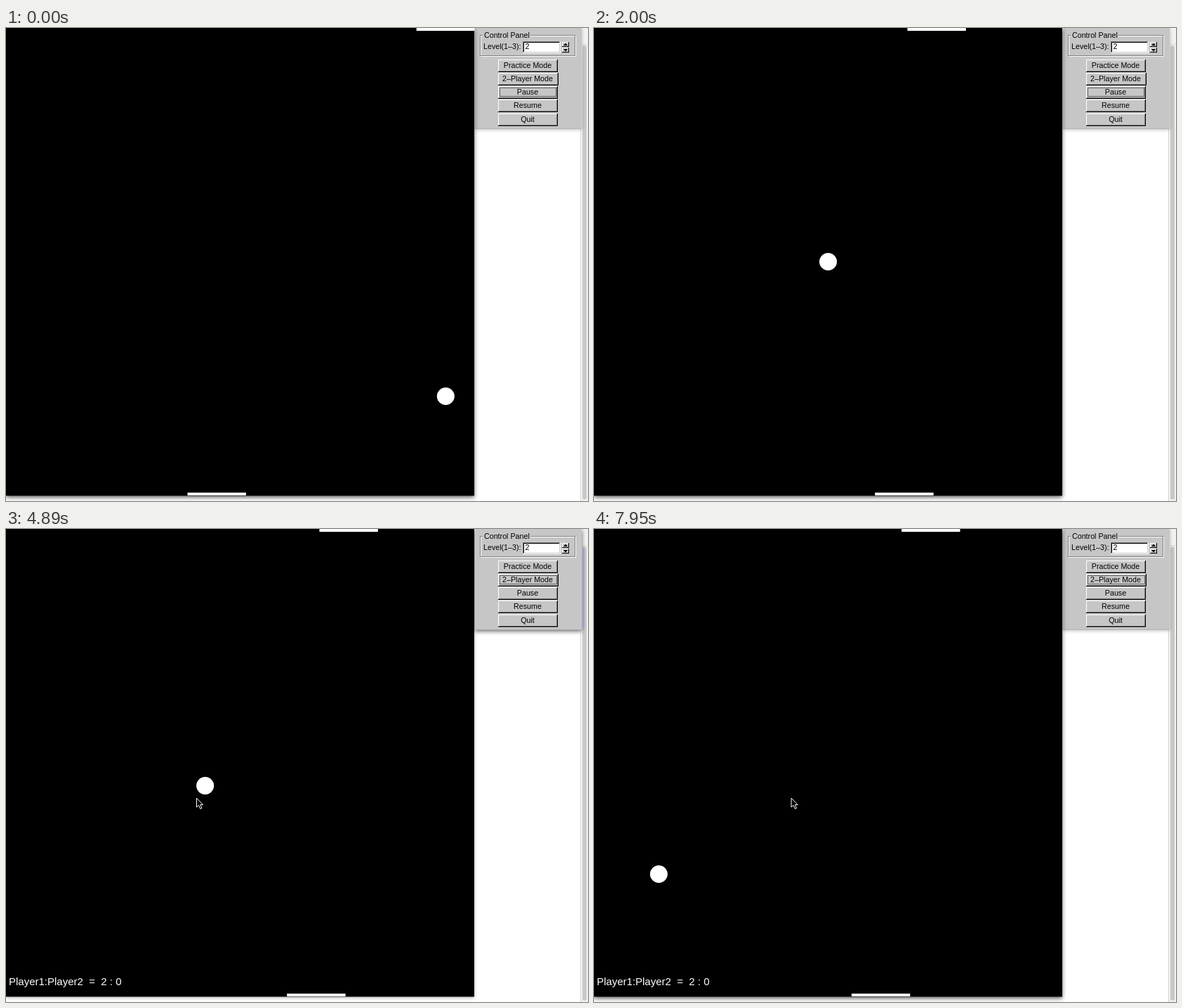
An HTML page with a canvas for the animation above (7.99 s loop, 829 by 675 pixels).

```html
<!DOCTYPE html>
<html lang="en">
<head>
<meta charset="utf-8">
<title>Pong</title>
<style>
  html, body { margin: 0; width: 100%; height: 100%; overflow: hidden; background: #fff; }
  canvas { display: block; }
</style>
</head>
<body>
<canvas id="stage" width="829" height="675"></canvas>
<script>
const ctx = document.getElementById('stage').getContext('2d');
const LOOP = 7990, FIELD = 667, CENTER = 333.5, RADIUS = 12.5;
const PADDLE = FIELD / 8, KEY_STEP = FIELD / 80;
const VX = 4.02, VY = 2.65, WALL = 655.7;
const SANS = '"Liberation Sans", Arial, sans-serif';

const BUTTONS = ['Practice Mode', '2–Player Mode', 'Pause', 'Resume', 'Quit'];
const ARROW = [[0, 0], [0, 13], [3, 10.3], [5.3, 15.4], [7.5, 14.4], [5.2, 9.5], [9.2, 9.5]];

// time, x, y
const POINTER_PATH = [
  [3050, 743, 318], [3520, 743, 318], [3700, 738, 255], [3900, 727, 140],
  [4100, 719, 80], [4190, 718, 75], [4370, 718, 75], [4620, 480, 210],
  [4780, 320, 350], [4890, 271.5, 384], [5000, 271.5, 384], [5090, 281, 384]
];

// Number of n evenly spaced ticks, first to last, reached at time t.
function ticks(t, first, last, n) {
  const i = Math.floor((t - first) / (last - first) * (n - 1) + 1e-6) + 1;
  return Math.max(0, Math.min(n, i));
}

function rect(x, y, w, h, color) {
  ctx.fillStyle = color;
  ctx.fillRect(x, y, w, h);
}

function text(str, x, y, size = 10.7, color = '#000', align = 'left') {
  ctx.font = `${size}px ${SANS}`;
  ctx.textAlign = align;
  ctx.fillStyle = color;
  ctx.fillText(str, x, y);
}

function bevel(x, y, w, h, light, dark) {
  rect(x, y, w, 1, light);
  rect(x, y, 1, h, light);
  rect(x, y + h - 1, w, 1, dark);
  rect(x + w - 1, y, 1, h, dark);
}

function windowBox(x, y, w, h, color, active) {
  ctx.save();
  ctx.shadowColor = `rgba(0,0,0,${active ? 0.6 : 0.28})`;
  ctx.shadowBlur = active ? 6 : 5;
  ctx.shadowOffsetY = active ? 2 : 1;
  rect(x, y, w, h, color);
  ctx.restore();
}

function drawPage(panelActive) {
  rect(0, 0, 829, 675, '#fff');
  rect(818, 0, 1, 675, '#d4d4d4');
  rect(819, 0, 10, 675, '#f2f2f2');
  rect(819, 23, 10, 1, '#dcdcdc');
  ctx.fillStyle = '#c8c8c8';
  ctx.beginPath();
  ctx.roundRect(821, 25, 6, 648, 3);
  ctx.fill();
  if (panelActive) rect(822, 28, 2, 115, '#b4b4ee');
}

function drawButton(label, i, focused) {
  const x = 701, y = Math.round(44.5 + i * 19.3), w = i === 1 ? 86 : 85, h = 18;
  bevel(x, y, w, h, '#fff', '#000');
  rect(x + 1, y + h - 2, w - 2, 1, '#808080');
  rect(x + w - 2, y + 1, 1, h - 2, '#808080');
  if (focused) {
    ctx.save();
    ctx.setLineDash([1, 1]);
    ctx.lineWidth = 1;
    ctx.strokeStyle = '#000';
    ctx.strokeRect(x + 2.5, y + 2.5, w - 5, h - 6);
    ctx.restore();
  }
  text(label, 743, y + 12, 10.7, '#000', 'center');
}

function drawSpinner() {
  for (const [y, dir] of [[20, -1], [28, 1]]) {
    bevel(792, y, 10, 7, '#fff', '#000');
    ctx.fillStyle = '#000';
    ctx.beginPath();
    ctx.moveTo(794, y + 3.5 - dir * 1.5);
    ctx.lineTo(800, y + 3.5 - dir * 1.5);
    ctx.lineTo(797, y + 3.5 + dir * 2);
    ctx.fill();
  }
}

function drawPanel(active, focusIndex) {
  windowBox(668, 0, 152, 144, '#c6c6c6', active);
  rect(668, 143, 152, 1, '#b4b4b4');
  ctx.lineWidth = 1;
  for (const [shift, color] of [[1, '#fff'], [0, '#808080']]) {
    ctx.strokeStyle = color;
    ctx.strokeRect(675.5 + shift, 10.5 + shift, 135, 29);
  }
  rect(679, 9, 68, 4, '#c6c6c6');
  text('Control Panel', 681, 14);
  text('Level(1–3):', 680, 30);
  rect(736, 19, 54, 17, '#fff');
  bevel(736, 19, 54, 17, '#808080', '#fff');
  bevel(737, 20, 52, 15, '#000', '#c6c6c6');
  text('2', 739.5, 30);
  drawSpinner();
  BUTTONS.forEach((label, i) => drawButton(label, i, i === focusIndex));
}

function gameState(t) {
  const first = ticks(t, 40, 800, 20) + ticks(t, 840, 1620, 20) + ticks(t, 1660, 2000, 9);
  const tracked = WALL - Math.abs(626.3 + VX * first - WALL);
  const second = t < 4370 ? 0
    : Math.min(20, 0.4 + ticks(t, 4410, 5180, 20))
      + ticks(t, 6330, 7120, 20) + ticks(t, 7160, 7950, 20);
  const ball = t < 2000
    ? [tracked, 525.5 + VY * first]
    : [CENTER - VX * second, CENTER + VY * second];
  const bottomKeys = ticks(t, 80, 800, 10) + ticks(t, 960, 1920, 7) - ticks(t, 7080, 7680, 4);
  return {
    ball,
    top: tracked - PADDLE / 2 - (t >= 7880 ? KEY_STEP : 0),
    bottom: 258.5 + KEY_STEP * bottomKeys
  };
}

function drawField(t, active) {
  const { ball, top, bottom } = gameState(t);
  windowBox(0, 0, FIELD, FIELD + 0.5, '#000', active);
  ctx.save();
  ctx.beginPath();
  ctx.rect(0, 0, FIELD, FIELD);
  ctx.clip();
  rect(top, 0, PADDLE, 4, '#fff');
  rect(bottom, 663, PADDLE, 4, '#fff');
  ctx.beginPath();
  ctx.arc(ball[0], ball[1], RADIUS, 0, Math.PI * 2);
  ctx.fill();
  if (t >= 4370) text('Player1:Player2  =  2 : 0', 4, 651, 15, '#fff');
  ctx.restore();
}

function drawPointer(time) {
  if (time < POINTER_PATH[0][0]) return;
  const t = Math.floor((time - 10) / 40) * 40 + 10;
  const next = POINTER_PATH.findIndex(p => p[0] > t);
  const b = POINTER_PATH.at(next), a = next > 0 ? POINTER_PATH[next - 1] : b;
  const f = a === b ? 0 : (t - a[0]) / (b[0] - a[0]);
  const x = a[1] + (b[1] - a[1]) * f, y = a[2] + (b[2] - a[2]) * f;

  if (x > 668 && y > 144) {
    const left = Math.round(x) - 3, upper = Math.round(y) - 8;
    rect(left + 3, upper + 1, 1, 14, '#000');
    for (const edge of [upper, upper + 15]) {
      rect(left, edge, 3, 1, '#000');
      rect(left + 4, edge, 3, 1, '#000');
    }
    return;
  }
  const overField = x < 668;
  ctx.beginPath();
  ARROW.forEach(([dx, dy]) => ctx.lineTo(x + dx, y + dy));
  ctx.closePath();
  ctx.fillStyle = overField ? '#000' : '#fff';
  ctx.strokeStyle = overField ? '#fff' : '#000';
  ctx.lineWidth = 1;
  ctx.fill();
  ctx.stroke();
}

function draw() {
  const t = performance.now() % LOOP;
  const panelActive = t >= 4280 && t < 5100;
  const focusIndex = t < 4280 ? 2 : 1;
  drawPage(panelActive);
  if (panelActive) {
    drawField(t, false);
    drawPanel(true, focusIndex);
  } else {
    drawPanel(false, focusIndex);
    drawField(t, true);
  }
  drawPointer(t);
  requestAnimationFrame(draw);
}
draw();
</script>
</body>
</html>
```
